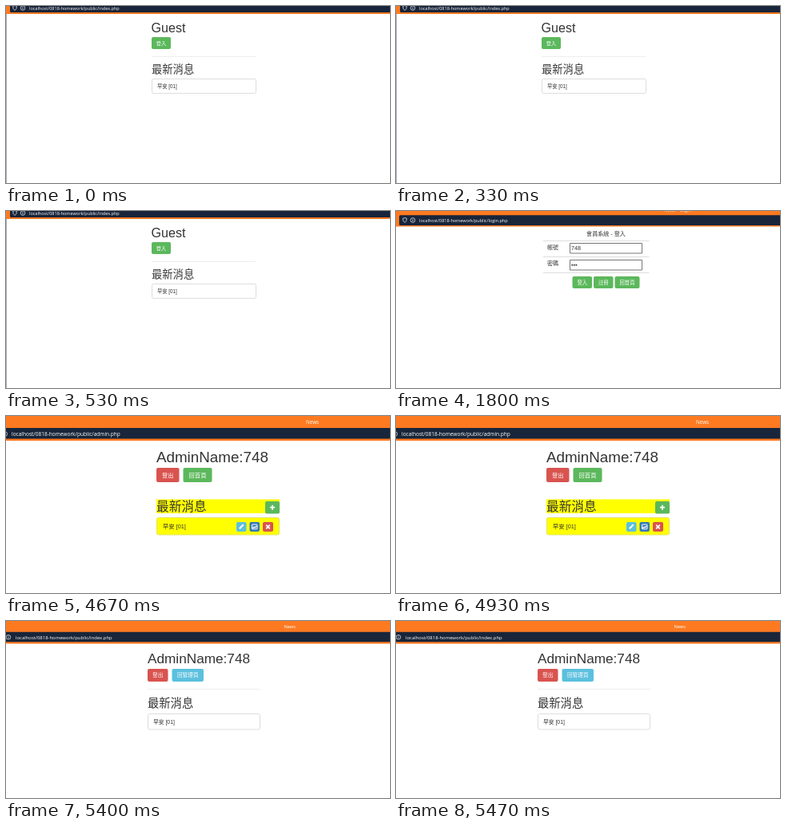
An HTML page with a canvas that plays this animation: 480 by 222 pixels, repeating every 7.19 s.

```html
<!DOCTYPE html>
<html lang="zh-Hant">
<head>
<meta charset="utf-8">
<title>News admin</title>
<style>
html, body { margin: 0; width: 100%; height: 100%; overflow: hidden; background: #fff; }
canvas { display: block; width: 480px; height: 222px; }
</style>
</head>
<body>
<canvas id="stage"></canvas>
<script>
const W = 480, H = 222, LOOP = 7190;
const ORANGE = '#fd7a21', NAVY = '#18253a', INK = '#333', LINE = '#ddd', YELLOW = '#ff0';
const GREEN = '#5cb85c', RED = '#d9534f', CYAN = '#5bc0de', BLUE = '#337ab7';
const PAGE = '"Liberation Sans", "Noto Sans CJK TC", "Noto Sans CJK", sans-serif';
const CJK = '"Noto Sans CJK TC", "Noto Sans CJK", sans-serif';
const CHROME = '"Open Sans", "Noto Sans", sans-serif';
const USER = '748';

const canvas = document.getElementById('stage');
const ctx = canvas.getContext('2d');
const dpr = window.devicePixelRatio || 1;
canvas.width = W * dpr;
canvas.height = H * dpr;
ctx.scale(dpr, dpr);

function rect(x, y, w, h, color) {
  ctx.fillStyle = color;
  ctx.fillRect(x, y, w, h);
}

function text(str, x, y, size, { color = INK, font = PAGE, weight = 400, align = 'left' } = {}) {
  ctx.font = `${weight} ${size}px ${font}`;
  ctx.fillStyle = color;
  ctx.textAlign = align;
  ctx.fillText(str, x, y);
}

function box(x, y, w, h, fill, stroke, r = 2) {
  ctx.beginPath();
  ctx.roundRect(x, y, w, h, r);
  if (fill) { ctx.fillStyle = fill; ctx.fill(); }
  if (stroke) { ctx.strokeStyle = stroke; ctx.lineWidth = 1; ctx.stroke(); }
}

function button(label, x, y, w, h, color, size) {
  box(x, y, w, h, color);
  text(label, x + w / 2, y + h / 2 + size * 0.37, size,
    { color: '#fff', font: CJK, weight: 500, align: 'center' });
}

function stroke(color, width, ...lines) {
  ctx.strokeStyle = color;
  ctx.lineWidth = width;
  ctx.beginPath();
  for (const [x1, y1, x2, y2] of lines) {
    ctx.moveTo(x1, y1);
    ctx.lineTo(x2, y2);
  }
  ctx.stroke();
}

function infoIcon(x, y) {
  ctx.strokeStyle = '#dfe3e8';
  ctx.lineWidth = 0.8;
  ctx.beginPath();
  ctx.arc(x, y, 2.8, 0, Math.PI * 2);
  ctx.stroke();
  rect(x - 0.4, y - 0.5, 0.8, 2, '#dfe3e8');
  rect(x - 0.4, y - 1.7, 0.8, 0.8, '#dfe3e8');
}

function shieldIcon(x, y) {
  ctx.strokeStyle = '#dfe3e8';
  ctx.lineWidth = 0.8;
  ctx.beginPath();
  ctx.moveTo(x - 2.4, y - 2.2);
  ctx.lineTo(x, y - 3);
  ctx.lineTo(x + 2.4, y - 2.2);
  ctx.quadraticCurveTo(x + 2.4, y + 1.8, x, y + 3);
  ctx.quadraticCurveTo(x - 2.4, y + 1.8, x - 2.4, y - 2.2);
  ctx.stroke();
}

// Browser header: orange block with the dark address bar inside it
function header(top, bottom, end, left, page, urlX, urlY, size) {
  rect(0, 0, W, end, ORANGE);
  box(left, top, W - left + 4, bottom - top, NAVY, null, left ? 1.5 : 0);
  text(`localhost/0818-homework/public/${page}.php`, urlX, urlY, size,
    { color: '#fff', font: CHROME, weight: 500 });
}

const tab = (label, x, y, size) => text(label, x, y, size, { color: '#fff', font: CHROME });
const newsTitle = (x, y, size) => text('最新消息', x, y, size, { font: CJK, weight: 300 });

function guestPage() {
  header(-6, 8, 10, 5, 'index', 29, 4.9, 5.54);
  shieldIcon(11, 2.5);
  infoIcon(21, 2.5);
  rect(0, 10, 1, H - 10, '#a3a8b5');
  text('Guest', 181.5, 33.3, 16.1);
  button('登入', 182, 39, 24, 15, GREEN, 6.2);
  rect(182, 63, 130.5, 1, '#eee');
  newsTitle(182, 84, 13.3);
  box(182.5, 91.5, 130, 18, '#fff', LINE);
  text('早安 [01]', 189, 103, 6.3);
}

function loginPage() {
  header(5.3, 18, 19.5, 4, 'login', 29, 13.8, 5.5);
  tab('News', 335, 0.8, 5.6);
  tab('Login', 355, 0.8, 5.6);
  shieldIcon(11, 11.5);
  infoIcon(21, 11.5);
  text('會員系統 - 登入', 262.5, 30.5, 7.1, { align: 'center' });
  for (const y of [37, 57, 77]) rect(184, y, 132.5, 1, LINE);
  text('帳號', 189, 47.8, 7.1);
  text('密碼', 189, 68.4, 7.1);
  box(217.5, 40.5, 90, 12.5, '#fff', '#777', 0);
  box(217.5, 61.5, 90, 12.5, '#fff', '#777', 0);
  text(USER, 219, 49.4, 7.2);
  ctx.fillStyle = INK;
  for (let i = 0; i < 3; i++) {
    ctx.beginPath();
    ctx.arc(220.2 + i * 2.6, 67.8, 1, 0, Math.PI * 2);
    ctx.fill();
  }
  button('登入', 220.5, 82, 24.5, 15, GREEN, 6.3);
  button('註冊', 247, 82, 24.5, 15, GREEN, 6.3);
  button('回首頁', 273.5, 82, 31, 15, GREEN, 6.3);
}

function adminPage() {
  header(15, 28.5, 31, 0, 'admin', 7, 25, 6.54);
  tab('News', 375, 10, 6.3);
  infoIcon(-1.2, 22.5);
  text('AdminName:' + USER, 188, 58.3, 18.8);
  button('登出', 188, 65, 28.5, 18, RED, 7.3);
  button('回首頁', 221.5, 65, 36, 18, GREEN, 7.3);

  rect(188, 104.5, 154, 17.5, YELLOW);
  newsTitle(188, 119, 15.7);
  box(324, 107, 18, 15.5, GREEN);
  stroke('#fff', 1.8, [330, 114.7, 336, 114.7], [333, 111.7, 333, 117.7]);

  box(188.5, 127.5, 153, 21.5, YELLOW, '#e3e36a');
  text('早安 [01]', 196, 140.8, 7.3);
  box(288, 133, 12.5, 12, CYAN);
  stroke('#fff', 2, [291.8, 141.3, 296.8, 136.3]);
  box(304.5, 133, 12.5, 12, BLUE);
  box(307.5, 136, 6.5, 5.8, null, '#fff', 0.5);
  stroke('#fff', 1.4, [308, 141, 310, 139], [310, 139, 311, 140], [311, 140, 313.5, 138]);
  box(321, 133, 13, 12, RED);
  stroke('#fff', 1.8, [325.2, 136.7, 329.8, 141.3], [329.8, 136.7, 325.2, 141.3]);
}

function homePage() {
  header(13.7, 26.3, 28.5, 0, 'index', 12, 22.7, 5.93);
  tab('News', 347.5, 9, 5.7);
  infoIcon(3, 20.3);
  text('AdminName:' + USER, 177, 53, 17.2);
  button('登出', 177, 60, 25.5, 16, RED, 6.7);
  button('回管理頁', 207.5, 60, 39.5, 16, CYAN, 6.7);
  rect(177, 85, 141, 1, '#eee');
  newsTitle(177, 108.3, 14.3);
  box(177.5, 116.5, 140, 19.5, '#fff', LINE);
  text('早安 [01]', 184, 128.8, 6.8);
}

const scenes = [[5400, homePage], [3600, adminPage], [1800, loginPage], [0, guestPage]];
const start = performance.now();

function frame() {
  const t = (performance.now() - start) % LOOP;
  rect(0, 0, W, H, '#fff');
  scenes.find(([from]) => t >= from)[1]();
  requestAnimationFrame(frame);
}
frame();
</script>
</body>
</html>
```
